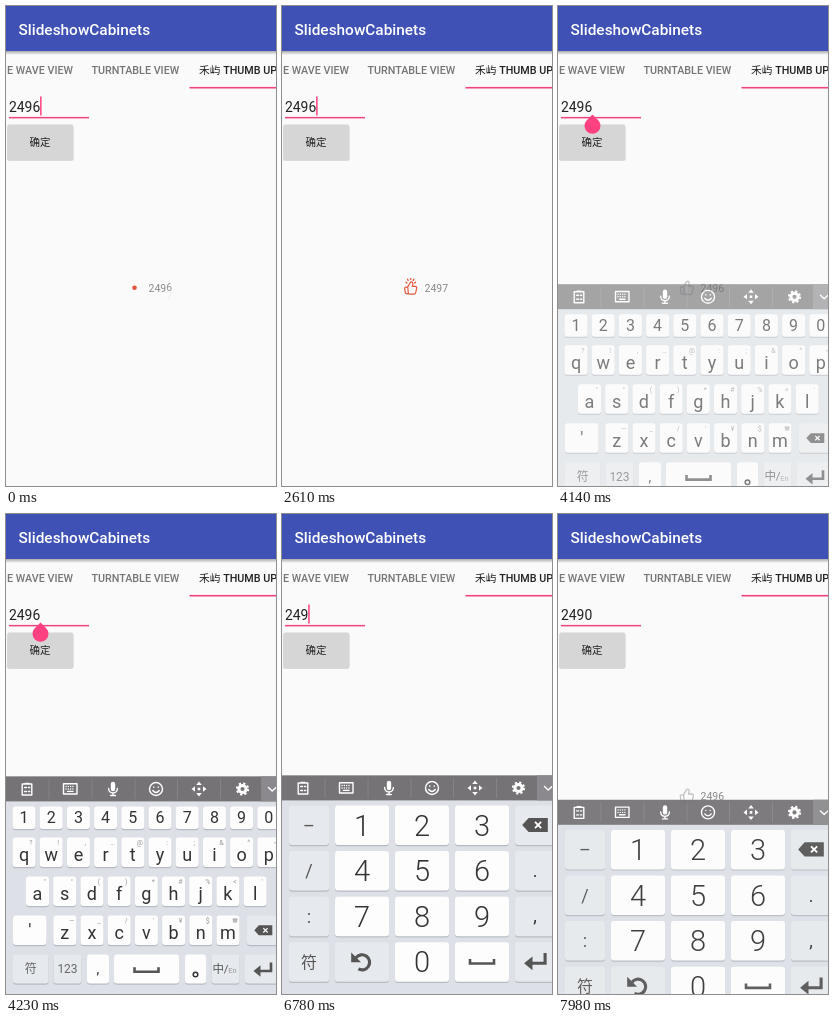
Animation of 270x480 px, one loop 8 s. Source, as an HTML page:

```html
<!DOCTYPE html>
<html lang="zh">
<head>
<meta charset="utf-8">
<title>Thumb up</title>
<style>
html, body { margin: 0; width: 100%; height: 100%; overflow: hidden; background: #fafafa; }
svg { display: block; width: 270px; height: 480px; }
text { font-family: Roboto, "Noto Sans CJK SC", "Noto Sans CJK", sans-serif; white-space: pre; }
.medium { font-weight: 500; }
.line { fill: none; stroke-linecap: round; stroke-linejoin: round; }
.key { fill: #fdfdfe; }
.side { fill: #e6e9ed; }
.pressed { fill: #bfc4cb; }
</style>
</head>
<body>
<svg viewBox="0 0 270 480">
  <defs>
    <linearGradient id="fade" x2="0" y2="1">
      <stop offset="0" stop-opacity=".32"/><stop offset="1" stop-opacity="0"/>
    </linearGradient>
    <path id="hand" d="M125.6 280.6L128.2 276.2Q129 274.6 130.4 275.3Q131.5 276 131.1 277.8L130.5 280H133.6Q135.7 280.1 135.3 282.2L134.2 286.8Q133.8 288.5 132 288.5H127.5Q126.4 288.5 126.2 287.3ZM125.4 280.8H123.8Q122.1 280.8 122.3 282.5L122.9 286.6Q123.2 288.3 124.8 288.3H126.4"/>
  </defs>
  <rect width="270" height="480" fill="#fafafa"/>
  <rect y="45" width="270" height="4" fill="url(#fade)"/>
  <rect width="270" height="45" fill="#3f51b5"/>
  <text class="medium" x="12.5" y="29.3" font-size="15.4" fill="#fff">SlideshowCabinets</text>
  <g class="medium" font-size="10.75" fill="#757575">
    <text x="67" y="68" text-anchor="end">E WAVE VIEW</text>
    <text x="85.5" y="68">TURNTABLE VIEW</text>
    <text x="193" y="68" fill="#212121">禾屿 THUMB UP</text>
  </g>
  <rect x="183.5" y="80.9" width="87" height="1.6" fill="#f0437f"/>

  <text id="field" x="3" y="105.5" font-size="13.9" fill="#212121"></text>
  <rect x="3" y="110.9" width="80" height="1.5" fill="#f0437f"/>
  <rect id="cursor" y="90.5" width="1.5" height="19" fill="#ff4081"/>

  <rect x="1" y="119.5" width="66.6" height="35.6" rx="2" fill="#000" opacity=".13"/>
  <rect x="1.3" y="118.6" width="66" height="35.3" rx="2" fill="#d6d6d7"/>
  <text class="medium" x="34" y="140" font-size="10.5" text-anchor="middle" fill="#212121">确定</text>
  <path id="handle" d="M34.5 108.5L40.2 114.2A8 8 0 1 1 28.8 114.2Z" fill="#ff4081"/>

  <g class="line" stroke-width="1.3">
    <use id="gray" href="#hand" stroke="#c2c2c2"/>
    <g id="red" stroke="#e2583e">
      <use href="#hand" transform="translate(10.2 22.7) scale(.92)"/>
      <path d="M124.8 277L124 276.2M126.2 274.4L125.5 273.2M128.7 273.6V272.4M131.2 274.3L131.9 273.2M132.7 277L133.5 276.2"/>
    </g>
    <circle id="ring" cx="128.5" cy="282" stroke="#e2583e"/>
  </g>
  <circle id="dot" cx="128.5" cy="281.8" r="2.3" fill="#e2583e"/>
  <g font-size="10.5" fill="#888">
    <text x="142.5" y="285.7">249</text>
    <text id="six" x="160.2">6</text>
    <text id="seven" x="160.2">7</text>
  </g>

  <g id="board">
    <rect y="261.4" width="270" height="219" fill="#dde1e7"/>
    <rect y="261.4" width="270" height="25" fill="#757376"/>
    <rect id="fold" x="255" y="261.4" width="15" height="25"/>
    <path d="M43 264V284M86 264V284M129 264V284M171.5 264V284M214.5 264V284" stroke="#858387"/>
    <g class="line" stroke="#fff" stroke-width="1.4">
      <path d="M16.2 269H25.8V280H16.2ZM19 268.4H23M18.7 272.5H20.5M18.7 276.5H20.5M22.5 272.5H23.7M22.5 276.5H23.7"/>
      <path d="M57.5 268.7H71V279H57.5ZM61.5 276.4H67"/>
      <path d="M60 271.5H69M60 274H69" stroke-dasharray=".1 2.2"/>
      <path d="M107 269V274" stroke-width="4.4"/>
      <path d="M102.6 273.5Q103 278 107 278T111.4 273.5M107 278V280.5M104.5 280.5H109.5"/>
      <circle cx="150" cy="274" r="6.5"/>
      <path d="M146.8 275.5Q150 279.5 153.2 275.5M147.8 272V272.2M152.2 272V272.2"/>
      <path d="M262.5 272.5L266.2 276L270 272.5"/>
      <circle cx="236.5" cy="274" r="3.6" stroke-width="3"/>
      <circle cx="236.5" cy="274" r="5.6" stroke-width="2" stroke-linecap="butt" stroke-dasharray="2.2 2.2"/>
    </g>
    <path fill="#fff" d="M193 266.5L195.8 270H190.2ZM193 281.5L195.8 278H190.2ZM185.5 274L189 271.2V276.8ZM200.5 274L197 271.2V276.8ZM191.7 272.7H194.3V275.3H191.7Z"/>
    <g id="letters"></g>
    <g id="digits"></g>
  </g>
</svg>
<script>
const $ = id => document.getElementById(id);
const clamp = v => Math.max(0, Math.min(1, v));
const escape = s => s.replace(/&/g, "&amp;").replace(/</g, "&lt;");

const label = (s, x, y, size, fill = "#333", weight = 400) =>
  `<text x="${x}" y="${y + size * .36}" font-size="${size}" font-weight="${weight}" fill="${fill}" text-anchor="middle">${escape(s)}</text>`;

// One key: box with a lower edge, optional caption and corner hint.
function key(x, y, w, h, { text = "", size = 17, side, id, hint, fill, weight } = {}) {
  const box = `x="${x}" width="${w}" height="${h}" rx="3"`;
  return `<rect ${box} y="${y + 1.2}" fill="#b7bcc4"/>
    <rect ${box} y="${y}" class="key${side ? " side" : ""}"${id ? ` id="${id}"` : ""}/>` +
    label(text, x + w / 2, y + h / 2 + (hint ? 2 : 0), size, fill, weight) +
    (hint ? label(hint, x + w - 4.5, y + 5, 7, "#999") : "");
}

// Icons have a stroked part and a solid part.
const icon = ([line, solid = ""], x, y, scale = 1) =>
  `<g transform="translate(${x} ${y}) scale(${scale})"><path d="${line}" class="line" stroke="#555"
    stroke-width="2.6" style="stroke-linecap:butt;stroke-linejoin:miter"/><path d="${solid}" fill="#555"/></g>`;
const space = ["M-12 -2.5V2H12V-2.5"];
const enter = ["M8 -7V1.5H-4", "M-9.5 1.5L-2.5 -4.2V7.2Z"];
const undo = ["M-5 -3.5A6.3 6.3 0 1 1 -3 5.8", "M-9 -8V.2H-.8Z"];
const erase = (x, y, s) => `<g transform="translate(${x} ${y}) scale(${s})">
  <path d="M-10 0L-5 -5.5H10V5.5H-5Z" fill="#555"/>
  <path d="M0 -2.4L4.8 2.4M4.8 -2.4L0 2.4" stroke="#fff" stroke-width="1.4"/></g>`;

const row = (chars, hints, x, y, h, size) => [...chars].map((text, i) =>
  key(x + i * 27.2, y, 23, h, { text, size, hint: hints[i] })).join("");

$("letters").innerHTML =
  row("1234567890", "", 6.5, 291.5, 22.5, 16) +
  row("qwertyuiop", "?!,…@:;&^~", 6.5, 322.5, 29.5, 18) +
  row("asdfghjkl", "\"°()*#%<'", 20, 361.5, 29.5, 18) +
  row("zxcvbnm", "—_/'¥$₩", 47.3, 400.5, 29.5, 18) +
  key(7, 400.5, 33.5, 29.5, { text: "'", size: 18 }) +
  key(241, 400.5, 36, 29.5, { side: true, id: "back" }) + erase(257.3, 415.3, .9) +
  key(7, 439.5, 35.5, 29, { text: "符", size: 12, side: true, fill: "#666" }) +
  key(47.5, 439.5, 28, 29, { text: "123", size: 12, side: true, id: "mode", fill: "#666" }) +
  key(81, 439.5, 22, 29, { text: ",", size: 14 }) +
  key(108, 439.5, 65, 29) + icon(space, 140.5, 454.8) +
  key(179, 439.5, 21, 29) +
  `<circle cx="189.5" cy="459.5" r="2.3" fill="none" stroke="#333" stroke-width="1.5"/>` +
  key(205.5, 439.5, 28, 29, { side: true }) +
  label("中/", 214.5, 453.5, 11.5, "#555") + label("En", 226.5, 455.5, 7.5, "#999") +
  key(239, 439.5, 40, 29, { side: true }) + icon(enter, 257, 454.5);

const rowY = i => 291.5 + i * 45.6;
let pad = "";
for (let i = 0; i < 4; i++) {
  const y = rowY(i);
  pad += key(7, y, 40, 39.5, { text: "–/:符"[i], size: i < 3 ? 18 : 16, side: true, fill: "#555" }) +
    key(233, y, 46, 39.5, { side: true });
  if (i < 3) for (let j = 0; j < 3; j++)
    pad += key(53 + j * 60, y, 54, 39.5, { text: `${i * 3 + j + 1}`, size: 29, weight: 300 });
}
$("digits").innerHTML = pad +
  key(53, rowY(3), 54, 39.5, { side: true }) + icon(undo, 80, 448, 1.2) +
  key(113, rowY(3), 54, 39.5, { text: "0", size: 29, weight: 300, id: "zero" }) +
  key(173, rowY(3), 54, 39.5) + icon(space, 200, 447.5) +
  erase(253, 311, 1.28) + label(".", 253, 357, 18) + label(",", 253, 402, 18) +
  icon(enter, 253.5, 447.5, 1.2);

const blinks = [420, 870, 1320, 1770, 2250, 2610, 3060, 3540, 3960, 4470,
  4920, 4950, 5400, 5850, 6300, 6780, 7560];
const taps = [[-60, 1], [810, 0], [1980, 1], [2640, 0]];

const show = (id, on) => $(id).setAttribute("visibility", on ? "visible" : "hidden");
const set = (id, attrs) => { for (const k in attrs) $(id).setAttribute(k, attrs[k]); };
const zoom = s => `translate(128.5 282) scale(${s}) translate(-128.5 -282)`;

function drawThumb(t) {
  const [start, liked] = taps.filter(([at]) => at <= t).pop();
  const age = t - start, swap = liked ? 60 : 130;
  const grown = clamp((age - swap) / 180);
  const s = age < swap ? 1 - .7 * age / swap
    : .3 + .7 * (1 - (1 - grown) ** 2) + (liked ? .08 * Math.sin(Math.PI * grown) : 0);
  const red = (age >= swap) === !!liked;
  const dot = liked && red && age < swap + 25;
  set("red", { transform: zoom(s) });
  set("gray", { transform: zoom(s) });
  show("red", red && !dot);
  show("gray", !red);
  show("dot", dot);
  const ripple = clamp((age - 85) / 200);
  show("ring", liked && ripple > 0 && ripple < 1);
  set("ring", { r: 3 + 8.5 * ripple, opacity: .5 * (1 - ripple) });

  const p = clamp((age - 30) / 270), roll = liked ? p : 1 - p;
  set("six", { y: 285.7 - 9 * roll, opacity: 1 - roll });
  set("seven", { y: 285.7 + 9 * (1 - roll), opacity: roll });
}

function drawField(t) {
  const value = t < 4950 ? "2496" : t < 7110 ? "249" : "2490";
  if ($("field").textContent !== value) $("field").textContent = value;
  show("cursor", blinks.filter(at => at <= t).length % 2 === 0);
  set("cursor", { x: value.length > 3 ? 34.1 : 26.2 });
  show("handle", t >= 3840 && t < 4950);
}

function drawBoard(t) {
  const rise = clamp((t - 4035) / 225), fall = clamp((t - 7870) / 200);
  const y = t < 6000 ? 60 * (1 - rise) ** 2 : 59 * fall ** 1.5;
  const opacity = t < 6000 ? clamp(rise * 1.35) : 1 - .2 * fall ** 2;
  set("board", { transform: `translate(0 ${y})`, opacity });
  const numeric = t >= 6420;
  $("letters").style.display = numeric ? "none" : "";
  $("digits").style.display = numeric ? "" : "none";
  const press = (id, from, to) => $(id).classList.toggle("pressed", t >= from && t < to);
  press("back", 4920, 5040);
  press("mode", 6300, 6420);
  press("zero", 7110, 7170);
  set("fold", { fill: t >= 7590 && t < 7680 ? "#a5a3a7" : "#8b898d" });
}

function draw(now) {
  const t = now % 8000;
  drawThumb(t);
  drawField(t);
  drawBoard(t);
}
const begin = performance.now();
function tick() {
  draw(performance.now() - begin);
  requestAnimationFrame(tick);
}
tick();
</script>
</body>
</html>
```
